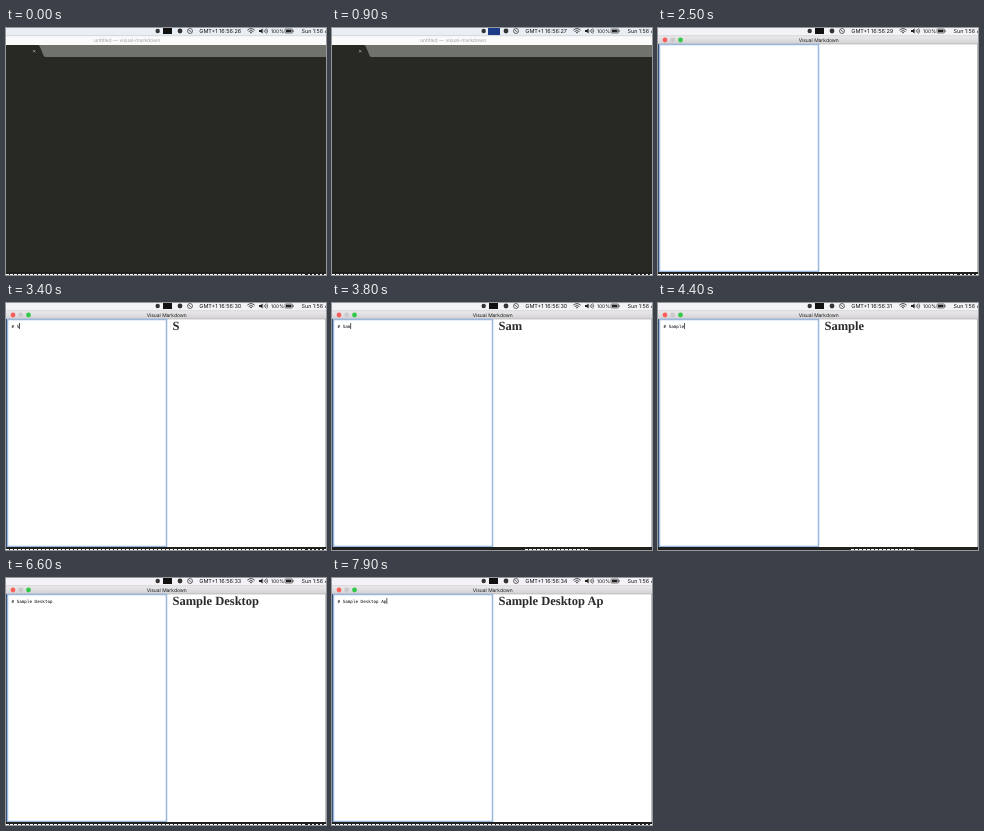
These frames come from a looping animation (320x247 px, 8000 ms). An HTML page:

```html
<!DOCTYPE html>
<html lang="en">
<head>
<meta charset="utf-8">
<title>Markdown editor demo</title>
<style>
html, body { margin: 0; width: 100%; height: 100%; overflow: hidden; background: #282923; }
svg { display: block; width: 100vw; height: 100vh; }
text { font-family: Inter, "Liberation Sans", sans-serif; font-size: 4.95px; fill: #1a1a1a; text-rendering: geometricPrecision; white-space: pre; }
.menu text { font-size: 5.4px; fill: #111; }
#clock { font-size: 5.5px; }
#source { font: 4.286px "DejaVu Sans Mono", monospace; fill: #000; }
#heading { font: bold 12.5px "Liberation Serif", serif; fill: #2a2a2a; }
</style>
</head>
<body>
<svg viewBox="0 0 320 247" preserveAspectRatio="none">
  <defs>
    <linearGradient id="bar" x2="0" y2="1">
      <stop stop-color="#ebe9eb"/><stop offset="1" stop-color="#d3d1d3"/>
    </linearGradient>
  </defs>

  <g id="code">
    <rect width="320" height="247" fill="#282923"/>
    <rect y="8" width="320" height="9" fill="#fafafa"/>
    <text x="88" y="13.8" style="font-size:5px;fill:#a2a2a2">untitled — visual-markdown</text>
    <path d="M32 17H320V29H39Q37.5 28.5 36.5 25L34 19Q33.3 17 32 17Z" fill="#70736c"/>
    <path d="M27 22l2.4 2.4m0-2.4l-2.4 2.4" stroke="#aaa" stroke-width=".7"/>
  </g>

  <g id="app">
    <rect y="8" width="320" height="236" fill="#fff"/>
    <rect y="8" width="320" height="8" fill="url(#bar)"/>
    <path d="M0 16H320" stroke="#aaa" stroke-width=".6"/>
    <circle cx="7" cy="12" r="2.4" fill="#fc605c"/>
    <circle cx="14.7" cy="12" r="2.4" fill="#cbc9cb"/>
    <circle cx="22.5" cy="12" r="2.4" fill="#34c84a"/>
    <text x="160.7" y="13.8" text-anchor="middle">Visual Markdown</text>
    <path d="M.5 16V244" stroke="#1d2f50"/>
    <path d="M1.5 16.5H160.500V243.500H1.500Z" fill="none" stroke="#98b8e0" stroke-width="1.5"/>
    <path d="M319.7 16V244" stroke="#777" stroke-width=".6"/>
    <text id="source" x="5.5" y="24.5"></text>
    <rect id="caret" y="20" width=".7" height="6" fill="#111"/>
    <text id="heading" x="166.5" y="27.3"></text>
  </g>

  <g class="menu">
    <rect id="menubar" width="320" height="8"/>
    <path d="M0 7.7H320" stroke="#c4c6ca" stroke-width=".6"/>
    <circle cx="151.7" cy="3" r="2.2" fill="#333"/>
    <rect id="badge" y="0"/>
    <circle cx="174" cy="3" r="2.4" fill="#333"/>
    <circle cx="184" cy="3" r="2.5" fill="none" stroke="#333" stroke-width=".7"/>
    <path d="M182.5 1.8l3 2.4" stroke="#333" stroke-width=".7"/>
    <text id="clock" x="193.3" y="4.9"></text>
    <g fill="none" stroke="#222" stroke-width=".8">
      <path d="M241.3 2.2Q245 -1 248.7 2.2M242.6 3.6Q245 1.5 247.4 3.6M244 4.9Q245 4 246 4.9"/>
      <path d="M258 1.8q1 1.2 0 2.4M259.3 1q1.8 2 0 4M260.6 .3q2.4 2.7 0 5.4" stroke-width=".6"/>
      <rect x="279" y="1" width="7.5" height="4" rx=".7" stroke-width=".6"/>
    </g>
    <path d="M253 2h1.6l2-1.6v5.2l-2-1.6H253ZM280 1.8h5.5v2.4H280ZM287 2.2h.6v1.6h-.6Z" fill="#222"/>
    <text x="265" y="4.9" style="font-size:4.9px">100%</text>
    <text x="295.5" y="4.9">Sun 1:56 AM</text>
  </g>

  <rect y="244" width="320" height="3" fill="#20211f"/>
  <path id="dashes" stroke="#fff" stroke-dasharray="3 1"/>
  <path id="tail" d="M300 246.5H320" stroke="#fff" stroke-dasharray="2 2" stroke-dashoffset="2"/>
</svg>
<script>
const LOOP = 8000, TEXT = "# Sample Desktop Ap", TEXT_X = 5.5, CHAR_W = 2.58;
const keys = [3000, 3200, 3400, 3600, 3800, 4000, 4200, 4400, 4700, 5000,
  5200, 5400, 5600, 6000, 6100, 6200, 7000, 7500, 7800];
const hidden = [[1500, 2000], [2500, 3000], [6600, 7000]];
const el = id => document.getElementById(id);
const within = (t, [a, b]) => t >= a && t < b;
const set = (id, attrs) => {
  for (const k in attrs) el(id).setAttribute(k, attrs[k]);
};
const show = (id, on) => set(id, { visibility: on ? "visible" : "hidden" });

function draw(t) {
  const open = t >= 1000, active = within(t, [900, 1000]);
  show("app", open);
  show("code", !open);
  set("menubar", { fill: open ? "#f3f3f7" : "#e9eef5" });
  set("badge", active
    ? { x: 156, width: 12, height: 7, fill: "#1d3c86" }
    : { x: 157, width: 9, height: 6, fill: "#111" });
  el("clock").textContent = "GMT+1 16:56:" + (26 + Math.floor((t + 800) / 1000));

  const typed = keys.filter(k => k <= t).length;
  el("source").textContent = TEXT.slice(0, typed);
  el("heading").textContent = TEXT.slice(2, Math.max(2, typed));
  set("caret", { x: TEXT_X + typed * CHAR_W });
  show("caret", open && !hidden.some(span => within(t, span)));

  const partial = within(t, [3700, 4700]);
  set("dashes", { d: partial ? "M193 246.5H257" : "M0 246.5H299" });
  show("tail", !partial);
}

const start = performance.now();
function tick() {
  draw((performance.now() - start) % LOOP);
  requestAnimationFrame(tick);
}
tick();
</script>
</body>
</html>
```
